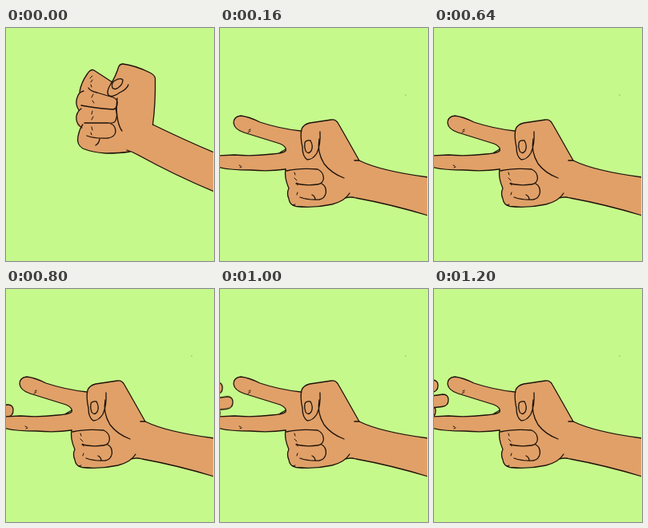
An HTML page that plays this animation: 260x292 px, repeating every 1240 ms.

```html
<!DOCTYPE html>
<html lang="en">
<head>
<meta charset="utf-8">
<title>Rock and scissors</title>
<style>
  html, body { margin: 0; width: 100%; height: 100%; overflow: hidden; background: #c6f98b; }
  svg { display: block; width: 100vw; height: 100vh; }
  .bg { fill: #c6f98b; }
  .skin { fill: #e0a068; }
  .ink { fill: none; stroke: #1d1209; stroke-width: 1.3; stroke-linecap: round; stroke-linejoin: round; }
  .thin { stroke-width: 1; }
  .finger { fill: #e0a068; }
  #scissors, #rival, #flash { animation: 1240ms step-end infinite; }
  #scissors { animation-name: swap; }
  #rival { animation-name: reach; animation-timing-function: linear; }
  #flash { animation-name: blink; }

  @keyframes swap {
    0% { opacity: 0; }
    9.677% { opacity: .5; }
    12.903%, 100% { opacity: 1; }
  }
  @keyframes blink {
    0%, 51.612%, 100% { opacity: 0; }
    48.387% { opacity: 1; }
  }
  @keyframes reach {
    0%, 54.8% { transform: translate(-4px, 163px); }
    64.516% { transform: translate(9px, 153px); animation-timing-function: ease-out; }
    80.645% { transform: translate(16px, 142.8px); animation-timing-function: ease-out; }
    96.774%, 100% { transform: translate(18px, 140px); }
  }
</style>
</head>
<body>
<svg viewBox="0 0 260 292" preserveAspectRatio="none">
  <defs>
    <path id="tip" d="M-45 -4C-28 -5 -13 -7 -7 -8C-2 -8 0 -5 0 -1C0 4 -3 7 -8 7.5C-16 8.5 -30 10 -45 11"/>
  </defs>

  <g id="fist">
    <rect class="bg" width="260" height="292"/>
    <path class="skin" d="M133 68L110 53Q106 51 102 57Q94 68 92 80Q87 88 88 97L91 103Q86 112 89 122L94 126Q88 136 90 143Q93 151 108 155Q130 158 155 155Q205 181 260 205V156L183.5 121Q187 95 186.5 63Q186 59 180 56Q162 47 146 45Q142 45 141 48Z"/>
    <g class="ink">
      <path d="M133 68L110 53Q106 51 102 57Q94 68 92 80"/>
      <path d="M97 79Q91 80 89 87Q86 95 91 103M94 101Q87 106 88 115Q89 121 95 125M96 121Q92 126 90 136Q88 146 96 151Q108 156 125 157Q142 157 155 155"/>
      <path d="M103 75Q105 79 114 81L134 87Q140 89 139 96Q138 101 134 102Q115 101 94 97"/>
      <path d="M137 101Q140 109 137 116Q135 120 127 119Q112 119 98 119"/>
      <path d="M131 120Q137 122 137 130Q136 137 127 138Q112 139 101 135M117 138Q117 144 112 147"/>
      <path d="M139 88Q137 104 140 117Q142 125 145 129"/>
      <path d="M153 71Q151 77 142 81Q132 88 128 84Q125 80 131 70Q137 61 141 48Q143 45 146 45Q162 47 180 56Q186 59 186.5 63Q187 95 183.5 121"/>
      <path d="M133 75Q131 69 136 66Q143 62 146 65Q146 71 140 75Q136 78 133 75"/>
      <path d="M183.5 121Q220 139 260 156M151 153Q158 155 165 159Q210 184 260 205"/>
      <path class="thin" d="M108 60L105 63M108 65L106 68M106 71L107 74M109 83L107 87M108 91L110 94M108 104L107 108M109 111L107 115M107 124L108 128M106 131L107 134"/>
    </g>
  </g>

  <g id="scissors">
    <rect class="bg" width="260" height="292"/>
    <g id="rival" class="ink">
      <use class="finger" href="#tip" x="-13" y="-18"/>
      <use class="finger" href="#tip" x="-16" y="14"/>
      <use class="finger" href="#tip"/>
    </g>
    <path class="skin" d="M101 129Q74 126 50 118Q36 111 26 110Q17 111 17 119Q18 127 30 131L75 145Q84 149 82 154Q79 157 65 158Q40 161 18 159L-3 160V174Q10 178 38 178Q62 180 82 177Q80 187 86 201Q82 211 90 222Q110 226 140 221Q153 218 160 211L171 213Q205 220 260 235V187Q200 179 174 166L148 120Q145 114 139 115L112 119Q103 121 101 129Z"/>
    <g class="ink">
      <path d="M101 129Q74 126 50 118Q36 111 26 110Q17 111 17 119Q18 127 30 131L75 145Q84 149 82 154Q79 157 65 158Q40 161 18 159L-3 160M-3 174Q10 178 38 178Q62 180 82 177"/>
      <path d="M75 156L82 152"/>
      <path d="M82 177Q80 187 86 201Q83 207 86 214Q87 222 95 223.5Q117 226 140 221Q156 217 162 207"/>
      <path d="M83 179Q100 175 122 177Q129 180 129.5 188Q129 195 122 196Q108 198 95 195"/>
      <path d="M127 195Q133 198 132.5 206Q131 214 124 215Q111 216 100 212M119 215Q119 211 115 209"/>
      <path d="M125 130Q126 146 121 157Q116 165 109 165Q103 161 103 149Q100 136 102 127Q104 121 112 119L139 115Q145 114 148 120Q160 141 174 166"/>
      <path d="M124 139Q121 155 130 170Q139 182 155 188"/>
      <path d="M106 144Q107 140 113 141Q117 148 114 154Q110 159 107 154Q105 149 106 144"/>
      <path d="M168 166L174 166Q200 179 260 187M157 213Q163 211 170 213Q214 221 260 235"/>
      <path class="thin" d="M36 128L38 127M35 131L38 129M24 172L26 173M25 175L27 174M93 181L94 184M93 188L96 191M96 194L97 197M97 206L96 209M91 222L94 221"/>
      <path class="thin" stroke-opacity=".6" d="M232 84L232.1 84"/>
    </g>
  </g>

  <rect id="flash" width="260" height="292" fill="#fefefc"/>
  <rect x="259" width="1" height="292" fill="#e2dfe8"/>
</svg>
</body>
</html>
```
